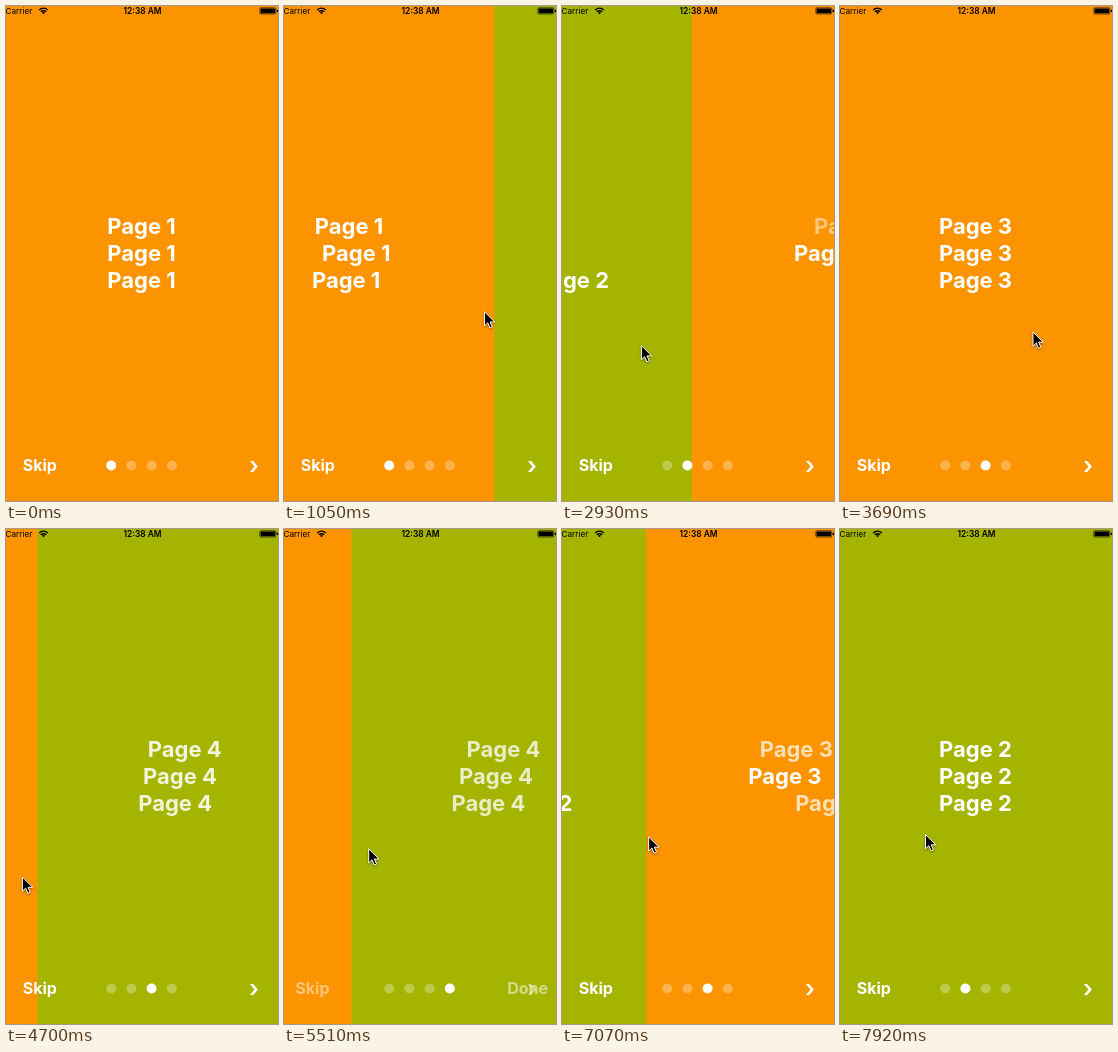
Animation of 272 by 495 pixels, one loop 8 s. Source, as an HTML page:

```html
<!DOCTYPE html>
<html lang="en">
<head>
<meta charset="utf-8">
<title>Intro pager</title>
<style>
  html, body { margin: 0; width: 100%; height: 100%; overflow: hidden; background: #fc9300; }
  svg { display: block; width: 100vw; height: 100vh; font-family: Inter, "Open Sans", sans-serif; }
  .line { font-size: 22px; font-weight: 700; fill: #fff; text-anchor: middle; }
  .button { font-size: 16px; font-weight: 700; fill: #fff; }
  .next { font-size: 24px; font-weight: 600; text-anchor: middle; }
  .status { font-size: 8.2px; }
  .clock { font-size: 8.4px; font-weight: 600; text-anchor: middle; }
  #cursor { filter: drop-shadow(0 1px 1px rgba(0, 0, 0, .4)); }
</style>
</head>
<body>
<svg viewBox="0 0 272 495" preserveAspectRatio="none">
  <g id="pages"></g>
  <g id="dots" fill="#fff"></g>
  <text id="skip" class="button" y="465">Skip</text>
  <text id="done" class="button" y="465">Done</text>
  <text id="next" class="button next" x="248" y="467.5">›</text>
  <g class="status">
    <text x="-.5" y="8">Carrier</text>
    <text class="clock" x="136.5" y="8">12:38 AM</text>
    <g fill="none" stroke="#000" stroke-width="1.3">
      <path d="M33.1 4.1a6.1 6.1 0 0 1 8.8 0M34.8 5.9a3.7 3.7 0 0 1 5.4 0"/>
    </g>
    <path d="M37.5 8.3L36 6.8a2.1 2.1 0 0 1 3 0Z"/>
    <rect x="253.8" y="1.8" width="16" height="6.2" rx="1.2" fill="none" stroke="#000" stroke-width=".6"/>
    <rect x="254.6" y="2.5" width="14.5" height="4.8" rx=".5"/>
    <path d="M270.7 3.8h1.3v2.2h-1.3z"/>
  </g>
  <path id="cursor" d="M.5.5V14.8L3.8 11.6L6 16.8L8.4 15.8L6.2 10.8H10.8Z" stroke="#fff"/>
</svg>
<script>
const LOOP = 8000;
const WIDTH = 278.4;     // the screen is slightly wider than the visible stage
const LEFT = -3.2;
const TEXT_LAG = 12;     // parallax follows the scroll a little late
const ORANGE = '#fc9300', GREEN = '#a4b400';

// Parallax level of each line, per page; level 0 is not animated.
const pages = [
  { color: ORANGE, levels: [10, 15, 8] },
  { color: GREEN, levels: [-10, 5, 20] },
  { color: ORANGE, levels: [8, 0, -10] },
  { color: GREEN, levels: [5, 10, 15] },
];

// start, duration, direction
const swipes = [
  [710, 1140, 1], [2450, 1140, 1], [4110, 1140, 1],
  [5290, 710, -1], [6680, 1140, -1],
];

// Drag followed by a decelerating settle.
const swipeKeys = [
  [0, 0], [150, .04], [300, .18], [400, .33], [480, .519], [590, .874],
  [680, .93], [800, .965], [1030, .991], [1140, 1],
];

// time, x, y
const cursorKeys = [
  [60, 273, 281], [250, 259, 281], [440, 254, 281], [710, 254, 281],
  [1010, 214, 300], [1190, 110, 328], [1300, 16, 336], [1420, 5, 338],
  [1740, 6, 337.5], [2000, 192, 326], [2180, 254, 318], [2450, 254, 316],
  [2750, 190, 328], [2930, 79.5, 339], [3040, 12, 346], [3200, 4, 348],
  [3450, 7, 346], [3690, 192, 325.5], [3870, 254, 316], [4110, 258, 318],
  [4410, 212, 333], [4590, 110, 345], [4700, 16, 347.5], [4850, 4, 348],
  [5290, 5, 345], [5490, 70, 322], [5650, 225, 300], [5740, 244, 292],
  [5900, 240, 290], [6220, 130, 291], [6470, 8, 318], [6680, 8, 322],
  [6980, 50, 312], [7160, 140, 303], [7270, 236, 300], [7530, 254, 300],
  [7780, 125, 303], [7920, 85, 305],
];

// Monotone cubic through the keys of one column.
function sample(keys, t, col = 1) {
  const last = keys.length - 1;
  if (t <= keys[0][0]) return keys[0][col];
  if (t >= keys[last][0]) return keys[last][col];
  const rate = k => (keys[k + 1][col] - keys[k][col]) / (keys[k + 1][0] - keys[k][0]);
  const slope = k => {
    if (k === 0 || k === last) return 0;
    const a = rate(k - 1), b = rate(k);
    return a * b > 0 ? 2 * a * b / (a + b) : 0;
  };
  const i = keys.findIndex(key => key[0] > t) - 1;
  const span = keys[i + 1][0] - keys[i][0];
  const u = (t - keys[i][0]) / span, v = 1 - u;
  return v * v * (1 + 2 * u) * keys[i][col] + u * u * (3 - 2 * u) * keys[i + 1][col]
    + span * u * v * (v * slope(i) - u * slope(i + 1));
}

const scrollAt = t => swipes.reduce(
  (sum, [start, dur, dir]) => sum + dir * sample(swipeKeys, (t - start) / dur * 1140), 0);

const pageAt = t => swipes.reduce(
  (page, [start, dur, dir]) => page + (t >= start + dur ? dir : 0), 0);

function fade(t, start) {
  const u = Math.min(1, Math.max(0, (t - start) / 500));
  return u < .5 ? (2 * u) ** 1.7 / 2 : 1 - (2 - 2 * u) ** 1.7 / 2;
}

const byId = id => document.getElementById(id);
function add(parent, tag, attrs, text = '') {
  const el = document.createElementNS('http://www.w3.org/2000/svg', tag);
  for (const name in attrs) el.setAttribute(name, attrs[name]);
  el.textContent = text;
  return parent.appendChild(el);
}

for (const [i, page] of pages.entries()) {
  page.group = add(byId('pages'), 'g', {});
  add(page.group, 'rect', { x: LEFT, width: WIDTH + .5, height: 495, fill: page.color });
  page.lines = page.levels.map((level, row) => add(page.group, 'text',
    { class: 'line', x: 135.5, y: 228.3 + 27 * row }, `Page ${i + 1}`));
  page.dot = add(byId('dots'), 'circle', { cx: 105.2 + 20.2 * i, cy: 459.5, r: 5 });
}

const move = (el, x, y = 0) => el.setAttribute('transform', `translate(${x} ${y})`);
const setOpacity = (el, value) => el.setAttribute('opacity', value);

function draw(t) {
  const scroll = scrollAt(t), late = scrollAt(t - TEXT_LAG), current = pageAt(t);
  pages.forEach((page, i) => {
    move(page.group, (i - scroll) * WIDTH);
    page.lines.forEach((line, row) => {
      const level = page.levels[row];
      if (!level) return;
      move(line, (i - late) * WIDTH * (1 / 3 - 10 * level / 414));
      if (i) setOpacity(line, Math.min(1, Math.max(0, 1 - i + late)));
    });
    setOpacity(page.dot, i === current ? 1 : .3);
  });

  const finish = fade(t, 5250) - fade(t, 6000);
  const skip = 1 - finish;
  move(byId('skip'), 6.7 + 10 * skip);
  move(byId('done'), 217 + 13.4 * skip);
  setOpacity(byId('skip'), skip);
  setOpacity(byId('next'), skip);
  setOpacity(byId('done'), finish);

  const cursor = byId('cursor');
  move(cursor, sample(cursorKeys, t, 1), sample(cursorKeys, t, 2));
  cursor.style.visibility = t < 60 ? 'hidden' : 'visible';
}

const begin = performance.now();
function tick() {
  draw((performance.now() - begin) % LOOP);
  requestAnimationFrame(tick);
}
tick();
</script>
</body>
</html>
```
